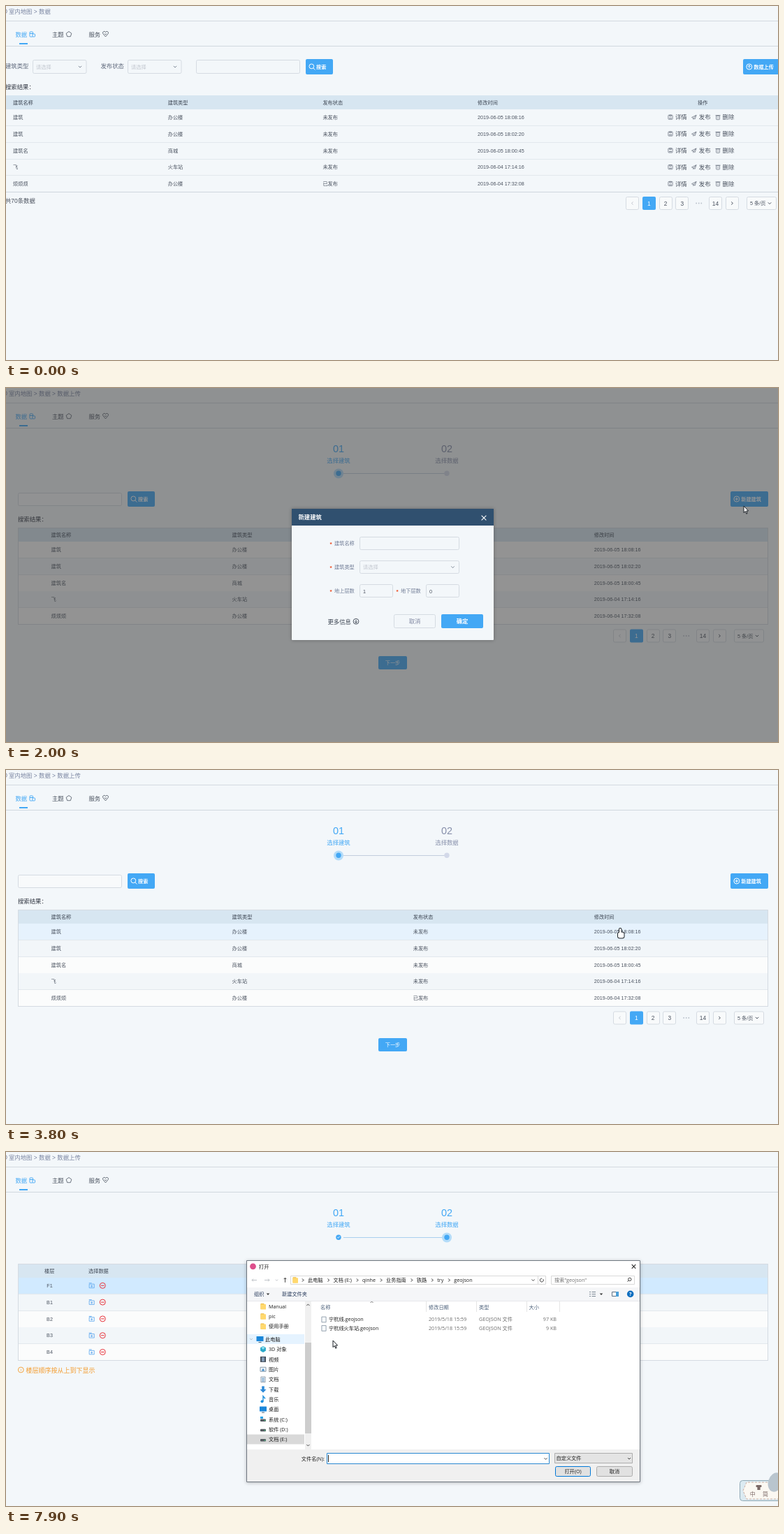
Animation of 1105 by 507 pixels, one loop 8 s. Source, as an HTML page with a canvas:

```html
<!DOCTYPE html>
<html lang="zh-CN">
<head>
<meta charset="utf-8">
<title>数据上传</title>
<style>
html, body { margin: 0; width: 100%; height: 100%; overflow: hidden; background: #f3f7fa; }
canvas { display: block; width: 1105px; height: 507px; }
</style>
</head>
<body>
<canvas id="stage" width="1105" height="507"></canvas>
<script>
const g = document.getElementById('stage').getContext('2d');
const CJK = '"Noto Sans CJK SC", "Noto Sans CJK JP", "Noto Sans CJK", sans-serif';
const WEB = '"Liberation Sans", ' + CJK;
const SYS = '"Open Sans", ' + CJK;
const LOOP = 8000, BG = '#f3f7fa', BLUE = '#43a8f5', DARK = '#4b5360', GREY = '#8088a2',
      EDGE = '#d5dbe2', ORANGE = '#f49b2c', FIELD = '#f8fafb', INK = '#1f1f1f';
let family = WEB;

// ---------- helpers ----------
const clamp = v => Math.max(0, Math.min(1, v));
const ramp = (t, start, length) => clamp((t - start) / length);
const smooth = p => p * p * (3 - 2 * p);
const easeOut = p => 1 - (1 - p) ** 2;

// y is the vertical middle of the text
function text(s, x, y, size = 7.2, color = DARK, weight = 400, align = 'left') {
  g.font = `${weight} ${size}px ${family}`;
  g.textAlign = align;
  g.fillStyle = color;
  g.fillText(s, x, y + size * 0.37);
}
const mid = (s, x, y, size, color, weight) => text(s, x, y, size, color, weight, 'center');

function paint(fill, stroke, lw = 1) {
  if (fill) { g.fillStyle = fill; g.fill(); }
  if (stroke) { g.strokeStyle = stroke; g.lineWidth = lw; g.stroke(); }
}
function box(x, y, w, h, r, fill, stroke, lw = 1) {
  const d = stroke ? lw / 2 : 0;
  g.beginPath();
  g.roundRect(x + d, y + d, w - 2 * d, h - 2 * d, r);
  paint(fill, stroke, lw);
}
function disc(x, y, r, fill, stroke, lw = 0.9) {
  g.beginPath();
  g.arc(x, y, r, 0, 7);
  paint(fill, stroke, lw);
}
function ngon(n, x, y, r, fill, stroke, lw) {
  g.beginPath();
  for (let i = 0; i < n; i++) {
    const a = i / n * 2 * Math.PI - Math.PI / 2;
    g.lineTo(x + r * Math.cos(a), y + r * Math.sin(a));
  }
  g.closePath();
  paint(fill, stroke, lw);
}
function trace(p) {
  g.beginPath();
  for (let i = 0; i < p.length; i += 2) g.lineTo(p[i], p[i + 1]);
}
function line(color, lw, ...p) { trace(p); paint(null, color, lw); }
function poly(color, ...p) { trace(p); paint(color); }
function at(x, y, draw) {
  g.save();
  g.translate(x, y);
  draw();
  g.restore();
}
const hr = (x, y, w, color) => box(x, y, w, 1, 0, color);
const vee = (x, y, c, w, h = w / 2, lw = 1) => line(c, lw, x - w, y - h, x, y + h, x + w, y - h);
const chevron = (x, y, c = '#7d8796', s = 2.2) => vee(x, y, c, s);
const angle = (x, y, c, s) => line(c, 1, x - s, y - 2, x + s, y, x - s, y + 2);
const check = (x, y, s, c, lw) => line(c, lw, x - s, y, x - s * 0.3, y + s * 0.7, x + s, y - s * 0.8);
const plus = (x, y, s, c) => { line(c, 1, x - s, y, x + s, y); line(c, 1, x, y - s, x, y + s); };
const cross = (x, y, s, c) => at(x, y, () => { g.rotate(Math.PI / 4); plus(0, 0, s * 1.4, c); });
function glass(x, y, r, c, side = 1) {
  disc(x, y, r, null, c, 1);
  line(c, 1, x + side * r * .7, y + r * .7, x + side * r * 1.5, y + r * 1.5);
}
function arrow(x, y, s, c, turn) {
  at(x, y, () => {
    g.rotate(turn);
    line(c, 1, -s, 0, s, 0);
    angle(s - 1, 0, c, 1);
  });
}

// ---------- shared page parts ----------
function head(upload) {
  disc(-1.6, 7.5, 3, null, GREY);
  text('室内地图 > 数据' + (upload ? ' > 数据上传' : ''), 4, 7.5, 8.4, '#7b86a2');
  hr(0, 21, 1105, '#d3dae0');
  ['数据', '主题', '服务'].forEach((s, i) => text(s, 13.5 + 52.5 * i, 40.5, 8.4, i ? DARK : BLUE));
  box(33.5, 36.5, 5.5, 8, 1, null, BLUE, .9);
  hr(34, 39, 5, BLUE);
  box(37.5, 39.5, 4.5, 5, 1, BG, BLUE, .9);
  ngon(5, 90, 40.5, 4, null, DARK, .8);
  at(142.5, 40, () => {
    g.beginPath();
    g.arc(-1.9, -1.5, 2.1, 2.5, 5.9);
    g.arc(1.9, -1.5, 2.1, 3.5, 6.9);
    g.lineTo(0, 4);
    g.closePath();
    paint(null, DARK, .8);
    vee(0, .3, DARK, 1.3, .7);
  });
  box(19, 53, 12, 2, 0, BLUE);
  hr(0, 57, 1105, '#d0d8df');
}

function searchButton(x, y) {
  box(x, y, 39, 22, 2, BLUE);
  glass(x + 8.3, y + 10.4, 3.4, '#fff');
  text('搜索', x + 15, y + 11.5, 7.2, '#fff', 700);
}

function wideButton(x, y, label, icon, color = BLUE) {
  box(x, y, 54, 22, 2, color);
  disc(x + 8.8, y + 11, 4, null, '#fff', 1);
  icon(x + 8.8, y + 11);
  text(label, x + 15.2, y + 11.5, 7.2, '#fff', 700);
}

function button(x, y, w, h, label, fill, color, size, weight, edge) {
  box(x, y, w, h, 2, fill, edge);
  mid(label, x + w / 2, y + h / 2, size, color, weight);
}

function select(x, y, w, h) {
  box(x, y, w, h, 2, null, EDGE);
  text('请选择', x + 5, y + h / 2, 7.2, '#c1c6ce');
  chevron(x + w - 9.5, y + h / 2);
}

function pager(x, y) {
  ['<', 1, 2, 3, '•', 14, '>'].forEach((s, i) => {
    const cx = x + 9.5 + i * 23.8, on = s === 1;
    if (s === '•') return [-3.6, 0, 3.6].forEach(d => disc(cx + d, y, .9, '#b9c0ca'));
    box(Math.round(cx - 9.5), y - 9.5, 19, 19, 2, on ? BLUE : FIELD, on ? null : EDGE);
    if (s === '<') angle(cx, y, '#c3c8cf', -1.1);
    else if (s === '>') angle(cx, y, DARK, 1.1);
    else mid(s, cx, y + .3, 8.4, on ? '#fff' : DARK);
  });
  box(x + 173, y - 9.5, 43, 19, 2, FIELD, EDGE);
  text('5 条/页', x + 178, y);
  chevron(x + 206, y, DARK);
}

const TITLES = ['建筑名称', '建筑类型', '发布状态', '修改时间'];
const ROWS = [
  ['建筑', '办公楼', '未发布', '2019-06-05 18:08:16'],
  ['建筑', '办公楼', '未发布', '2019-06-05 18:02:20'],
  ['建筑名', '商城', '未发布', '2019-06-05 18:00:45'],
  ['飞', '火车站', '未发布', '2019-06-04 17:14:16'],
  ['烦烦烦', '办公楼', '已发布', '2019-06-04 17:32:08']
];
const rowY = (top, i) => top + 20 + 23.8 * i;
const rowMid = (top, i) => rowY(top, i) + 11.3;
const title = (s, x, y) => text(s, x, y, 7.2, '#3c4552', 500);

// hot is the strength of the first row's highlight
function tableFrame(x, w, top, striped, hot) {
  box(x, top, w, 20, 0, '#d7e6f1');
  for (let i = 0; i < 5; i++) {
    const y = Math.round(rowY(top, i));
    if (striped) box(x, y, w, 24, 0, i % 2 ? '#f2f6f9' : '#fbfcfc');
    if (!i && hot) box(x, y, w, 24, 0, `rgba(209,234,255,${hot})`);
    hr(x, y + 23, w, i < 4 ? '#e2e8ed' : '#ced6dd');
  }
  if (striped) box(x, top, w, 139, 0, null, EDGE);
}

function cells(x, step, top) {
  TITLES.forEach((s, c) => title(s, x + step * c, top + 10));
  ROWS.forEach((r, i) => r.forEach((s, c) => text(s, x + step * c, rowMid(top, i))));
}

// ---------- pages ----------
function listPage() {
  head(false);
  ['建筑类型', '发布状态'].forEach((s, i) => {
    text(s, -1 + 136.4 * i, 86, 8.4, '#5f697c');
    select(38 + 136 * i, 77, 77.5, 20);
  });
  box(272, 77, 149, 20, 2, null, EDGE);
  searchButton(429, 76);
  wideButton(1055, 76, '数据上传', (x, y) => arrow(x, y, 2.2, '#fff', -Math.PI / 2));
  text('搜索结果：', -1, 115.5, 8.4, '#2f3540', 500);
  tableFrame(0, 1105, 128);
  cells(10, 221.7, 128);
  title('操作', 990, 138);
  const c = '#707886';
  for (let i = 0; i < 5; i++) at(951, rowMid(128, i), () => {
    box(-3.5, -3.5, 7, 7, 1, null, c, .8);
    box(-1.7, -3.5, 3.4, 2.6, 0, null, c, .8);
    hr(-2, 1, 4, c);
    line(c, .8, 37, -3, 30.5, .2, 33, 1.5, 37, -3, 35.2, 2.6, 33, 1.5, 32.8, 3.4);
    hr(64.5, -3, 7, c);
    box(65.2, -2.4, 5.6, 6.2, .6, null, c, .8);
    line(c, .7, 68, -.6, 68, 2.2);
    ['详情', '发布', '删除'].forEach((s, k) => text(s, 7 + 33.8 * k, 0, 8.4));
  });
  text('共70条数据', -1, 279, 8.4, '#4a515d');
  pager(887, 282.5);
}

function steps(current) {
  hr(483, 122, 145, current ? '#a9cfee' : '#c3cede');
  ['选择建筑', '选择数据'].forEach((s, i) => {
    const x = 476 + 155 * i, color = i <= current ? BLUE : '#8790ab';
    mid('0' + (i + 1), x, 86.5, 14.4, color);
    mid(s, x, 103.5, 8.4, color);
    if (i === current) disc(x, 122.5, 7, '#b3dcf9');
    disc(x, 122.2, 3.7, i <= current ? BLUE : '#d3d9e9');
    if (i < current) check(x, 122, 1.8, '#fff', .9);
  });
}

function buildingPage(t) {
  head(true);
  steps(0);
  box(17, 150, 149, 19, 2, FIELD, EDGE);
  searchButton(174, 148);
  const hover = t >= 1500 && t < 2000;
  wideButton(1037, 148, '新建建筑', (x, y) => plus(x, y, 2.2, '#fff'), hover ? '#4a98ec' : BLUE);
  text('搜索结果：', 17, 188, 8.4, '#2f3540', 500);
  tableFrame(17, 1074, 200, true, ramp(t, 3700, 200));
  cells(64.5, 259.1, 200);
  if (t >= 4200) check(36, 231.5, 3.8, '#2d8cf0', 1.7);
  pager(869, 355);
  button(533, 384, 41, 19, '下一步', t >= 5000 ? '#549ff2' : BLUE, '#fff');
}

function floorPage(t) {
  head(true);
  steps(1);
  tableFrame(17, 1074, 160, true, ramp(t, 6250, 220));
  title('楼层', 55, 170);
  title('选择数据', 118, 170);
  ['F1', 'B1', 'B2', 'B3', 'B4'].forEach((s, i) => at(122.7, rowMid(160, i), () => {
    const c = '#69aef0', red = '#e8323a';
    mid(s, -60.2, 0);
    box(-4, -2.6, 8, 6.4, 0, null, c, .9);
    hr(-4, -4, 4, c);
    plus(0, .8, 1.6, c);
    disc(15.6, 0, 4, null, red, 1);
    hr(13.3, -.5, 4.6, red);
  }));
  disc(21.3, 312, 3.9, null, ORANGE);
  mid('i', 21.3, 312, 6, ORANGE);
  text('楼层顺序按从上到下显示', 28.5, 312.3, 9, ORANGE);
  button(499, 337, 41, 19, '上一步', '#fdfefe', DARK, 7.2, 400, EDGE);
  button(560, 337, 48, 19, '开始导入', ORANGE, '#fff', 7.2, 500);
}

// ---------- new building form ----------
function field(label, x, y, w, value) {
  mid('*', x - 5, y + 1.5, 8, '#ed4014', 700);
  text(label, x, y, 7.2, '#6f7b95');
  if (value === undefined) return select(x + 36, y - 9, w, 19);
  box(x + 36, y - 9, w, 19, 2, null, EDGE);
  text(value, x + 41, y + 1);
}

function form(grow, alpha) {
  g.save();
  g.globalAlpha = alpha;
  g.translate(553.5, 267);
  g.scale(0.9 + 0.1 * grow, 0.9 + 0.1 * grow);
  g.translate(-553.5, -267);
  g.shadowColor = 'rgba(0,0,0,.3)';
  g.shadowBlur = 5;
  box(409, 173, 289, 188, 1, BG);
  g.shadowColor = 'transparent';
  box(409, 173, 289, 24, 0, '#30506f');
  text('新建建筑', 418.5, 185, 8.4, '#fff', 700);
  cross(684, 186, 3.4, '#fff');
  field('建筑名称', 470, 222, 143, '');
  field('建筑类型', 470, 256, 143);
  field('地上层数', 470, 290, 48, '1');
  field('地下层数', 565, 290, 48, '0');
  text('更多信息', 460.5, 334.5, 8.4, '#3c4552');
  disc(501, 334.3, 3.9, null, '#3c4552');
  arrow(501, 334.3, 2.2, '#3c4552', Math.PI / 2);
  button(555, 324, 60, 20, '取消', null, GREY, 8.4, 400, EDGE);
  button(623, 324, 60, 20, '确定', BLUE, '#fff', 8.4, 700);
  g.restore();
}

// ---------- file dialog ----------
const caret = (x, y, c = '#333') => poly(c, x - 2.3, y - 1, x + 2.3, y - 1, x, y + 1.5);
function folder(x, y) {
  box(x - 3.5, y - 4, 5, 8, .5, '#e9b93f');
  box(x - 3.5, y - 3, 7.5, 7.5, .5, '#ffd86e');
}
function screen(x, y) {
  box(x - 5, y - 4, 10, 7, .5, '#1a86d9');
  hr(x - 2, y + 4, 4, '#4b6478');
}
function drive(x, y) {
  box(x - 4, y - .5, 8, 3.5, 1, '#555b61');
  hr(x + 1.5, y + 1, 2, '#4fd08c');
}
function sheet(x, y) {
  box(x - 3.5, y - 4, 7, 8.5, 0, '#f7fafc', '#7f8f9e', .8);
}

const PLACES = {
  '3D 对象': (x, y) => { ngon(6, x, y, 4.5, '#2aa9c9'); ngon(4, x, y - 2, 2.4, '#8fe0f0'); },
  '视频': (x, y) => { box(x - 4, y - 4, 8, 8, 0, '#46505c'); box(x - 2, y - 3, 4, 6, 0, '#8199b4'); },
  '图片': (x, y) => { box(x - 4.5, y - 3.5, 9, 7, 0, '#eef4f9', '#8a9aa8'); ngon(3, x, y + 1, 2.5, '#3c87c4'); },
  '文档': (x, y) => { sheet(x, y); [-2, 0, 2].forEach(d => hr(x - 2, y + d, 4, '#5d93c2')); },
  '下载': (x, y) => { box(x - 1.8, y - 4.5, 3.6, 6, 0, '#2f8ad8'); poly('#2f8ad8', x - 4.5, y, x + 4.5, y, x, y + 4.8); },
  '音乐': (x, y) => { disc(x - 1.5, y + 3, 2, '#1c8fdd'); line('#1c8fdd', 1.4, x, y + 3, x, y - 4.5, x + 3, y - 1); },
  '桌面': screen,
  '系统 (C:)': (x, y) => { drive(x, y); box(x - 4, y - 4, 4, 3, 0, '#29a3e8'); },
  '软件 (D:)': drive,
  '文档 (E:)': drive
};
const CRUMBS = ['此电脑', '文档 (E:)', 'qinhe', '业务指南', '铁路', 'try', 'geojson'];
const COLUMNS = { '名称': 450, '修改日期': 605, '类型': 677, '大小': 748.5 };
const FILES = { '宁杭线.geojson': '97 KB', '宁杭线火车站.geojson': '9 KB' };

function dialogBar() {
  disc(353.5, 163.8, 4.4, '#dd4f8c');
  text('打开', 362, 164, 7.2, INK);
  cross(898.5, 164, 2.8, INK);
  arrow(355.5, 183.5, 3.5, '#c0c4c9', Math.PI);
  arrow(373.5, 183.5, 3.5, '#c0c4c9', 0);
  chevron(387.5, 183.5, '#c0c4c9', 1.6);
  arrow(399.5, 183.5, 3.3, '#444', -Math.PI / 2);
  box(407, 177, 366, 13, 0, '#fff', '#d9d9d9');
  folder(414, 183.3);
  let x = 432;
  for (const s of CRUMBS) {
    angle(x - 7, 183.5, INK, 1);
    text(s, x, 183.3, 7.2, INK);
    x += g.measureText(s).width + 15;
  }
  chevron(754.5, 183.5, '#444', 2);
  box(761, 177, 1, 13, 0, '#d9d9d9');
  g.beginPath();
  g.arc(766.8, 183.6, 2.5, -.6, 4.9);
  paint(null, '#444');
  box(780, 177, 120, 13, 0, '#fff', '#d9d9d9');
  text('搜索"geojson"', 785, 183.3, 7.2, '#6d6d6d');
  glass(892.8, 182.4, 2.2, '#444', -1);

  box(345, 194, 562, 19, 0, '#f5f6f8');
  hr(345, 213, 562, '#e6e8eb');
  text('组织', 355, 203.5, 7.2, '#26395a');
  text('新建文件夹', 395, 203.5, 7.2, '#26395a');
  caret(375, 203.5);
  caret(852, 203.5);
  [-3, 0, 3].forEach(d => { hr(835, 203 + d, 2, '#75828f'); hr(838.5, 203 + d, 5.5, '#75828f'); });
  box(867, 200, 10, 7, 0, '#fff', '#5c6f82');
  box(873, 200, 4, 7, 0, '#4b9fd8');
  disc(893.7, 203.4, 4.8, '#0f6fc0');
  mid('?', 893.7, 203.4, 7.2, '#fff', 700);
}

function dialogSide() {
  ['Manual', 'pic', '使用手册'].forEach((s, i) => {
    folder(368, 221 + i * 14.2);
    text(s, 376, 221 + i * 14.2, 7.2, INK);
  });
  box(345, 261, 82, 14, 0, '#e5f3ff');
  chevron(351, 268, '#b5bcc4', 1.8);
  screen(363.5, 268);
  text('此电脑', 371, 268.2, 7.2, INK);
  box(345, 404.5, 82, 14, 0, '#d9d9d9');
  Object.entries(PLACES).forEach(([s, icon], i) => {
    const y = 282.6 + i * 14.33;
    icon(368, y);
    text(s, 376, y, 7.2, INK);
  });
  box(428, 214, 9, 213, 0, '#f0f0f0');
  box(428, 273, 9, 130, 0, '#cdcdcd');
  vee(432.4, 219, '#505050', 2.1, -1.1);
  vee(432.4, 420, '#505050', 2.1);
}

function dialog() {
  family = SYS;
  g.save();
  g.shadowColor = 'rgba(0,0,0,.25)';
  g.shadowBlur = 5;
  g.shadowOffsetY = 1;
  box(344, 155, 564, 318, 0, '#fff');
  g.restore();
  dialogBar();
  dialogSide();

  vee(523.5, 215, '#777', 2, -1);
  for (const [s, x] of Object.entries(COLUMNS)) {
    text(s, x, 222, 7.2, '#4c607a');
    if (x > 450) box(Math.round(x - 4), 214, 1, 15, 0, '#e5e5e5');
  }
  box(792, 214, 1, 15, 0, '#e5e5e5');
  Object.entries(FILES).forEach(([name, size], i) => {
    const y = 239.7 + i * 12.5, soft = '#6d6d6d';
    sheet(455, y);
    text(name, 462, y, 7.2, INK);
    text('2019/5/18 15:59', COLUMNS['修改日期'], y, 7.2, soft);
    text('GEOJSON 文件', COLUMNS['类型'], y, 7.2, soft);
    text(size, 788, y, 7.2, soft, 400, 'right');
  });

  box(345, 426, 562, 46, 0, '#f0f0f0');
  text('文件名(N):', 456, 439, 7.2, INK, 400, 'right');
  box(459, 431, 319, 16, 0, '#fff', '#2a88d2');
  box(461, 434, 1, 10, 0, '#222');
  chevron(772.5, 439.3, '#444', 2);
  box(785, 431, 112, 15, 0, '#e4e4e4', '#adadad');
  text('自定义文件', 787.5, 438.8, 7.2, INK);
  chevron(892, 439, '#444', 2);
  button(786, 450, 51, 15, '打开(O)', '#e1e1e1', INK, 7.2, 400, '#0078d7');
  button(845, 450, 52, 15, '取消', '#e1e1e1', INK, 7.2, 400, '#adadad');
  box(344, 155, 564, 318, 0, null, '#6f7780');
  family = WEB;
}

function inputBar() {
  const brown = '#7b6966';
  box(1050, 470, 66, 30, 4, '#dbeaf1', '#8fa9b5');
  const edge = [1105, 473, 1060, 473, 1055, 485, 1060, 497, 1105, 497];
  poly('#fbf8f2', ...edge);
  g.setLineDash([3, 2]);
  line('#c9a79b', .9, ...edge);
  g.setLineDash([]);
  g.beginPath();
  g.ellipse(1101, 473, 10, 14, .3, 0, 7);
  paint('#b9c5ce');
  box(1073.5, 477, 8, 3, 1, brown);
  box(1075.4, 477, 4.2, 7, 0, brown);
  mid('中', 1068.7, 490, 8, brown);
  mid('简', 1087, 490, 8, brown);
}

// ---------- pointer: start, end, where to, hand on arrival ----------
const MOVES = [
  [100, 500, 1081, 92, true],
  [1300, 1800, 1056, 169],
  [2000, 2700, 680, 180, true],
  [2900, 3000, 688, 190],
  [3300, 3900, 884, 228, true],
  [4300, 5100, 567, 390, true],
  [5700, 6300, 103, 194, true],
  [6400, 6700, 123, 190, true],
  [7600, 7900, 468, 270]
];

function pointer(t) {
  let x = 1115, y = 115, hand = false;
  for (const [start, end, toX, toY, press] of MOVES) {
    if (t < start) break;
    const p = easeOut(ramp(t, start, end - start));
    x += (toX - x) * p;
    y += (toY - y) * p;
    if (p) hand = press && p > .8;
  }
  at(Math.round(x), Math.round(y), () => {
    if (hand) {
      const finger = () => { g.beginPath(); g.roundRect(-1, 0, 2.4, 9, 1); g.roundRect(-3, 5.5, 8.5, 8, 2.5); };
      finger();
      paint(null, '#1b2026', 2);
      paint('#fff');
    } else {
      const shape = [0, 0, 0, 9.6, 2.2, 7.6, 3.8, 11.2, 5.2, 10.6, 3.7, 7.1, 6.6, 7, 0, 0];
      poly('#fff', ...shape);
      line('#1b2026', 1, ...shape);
    }
  });
}

// ---------- timeline ----------
function draw(t) {
  g.fillStyle = BG;
  g.fillRect(0, 0, 1105, 507);
  if (t < 700) listPage();
  else if (t < 5400) buildingPage(t);
  else floorPage(t);

  // the form settles sooner than the shade behind it
  const fade = (inTime, outTime) => smooth(ramp(t, 1765, inTime)) * (1 - smooth(ramp(t, 3120, outTime)));
  const shade = fade(300, 300), shown = fade(230, 180);
  if (shade) {
    g.fillStyle = `rgba(55,55,55,${0.6 * shade})`;
    g.fillRect(0, 0, 1105, 507);
  }
  if (shown) form(shown, shown);
  if (t >= 7300) {
    dialog();
    inputBar();
  }
  pointer(t);
}

// the screen refreshes ten times a second
function tick(now) {
  draw(Math.floor(now % LOOP / 100) * 100);
  requestAnimationFrame(tick);
}
draw(0);
requestAnimationFrame(tick);
</script>
</body>
</html>
```
